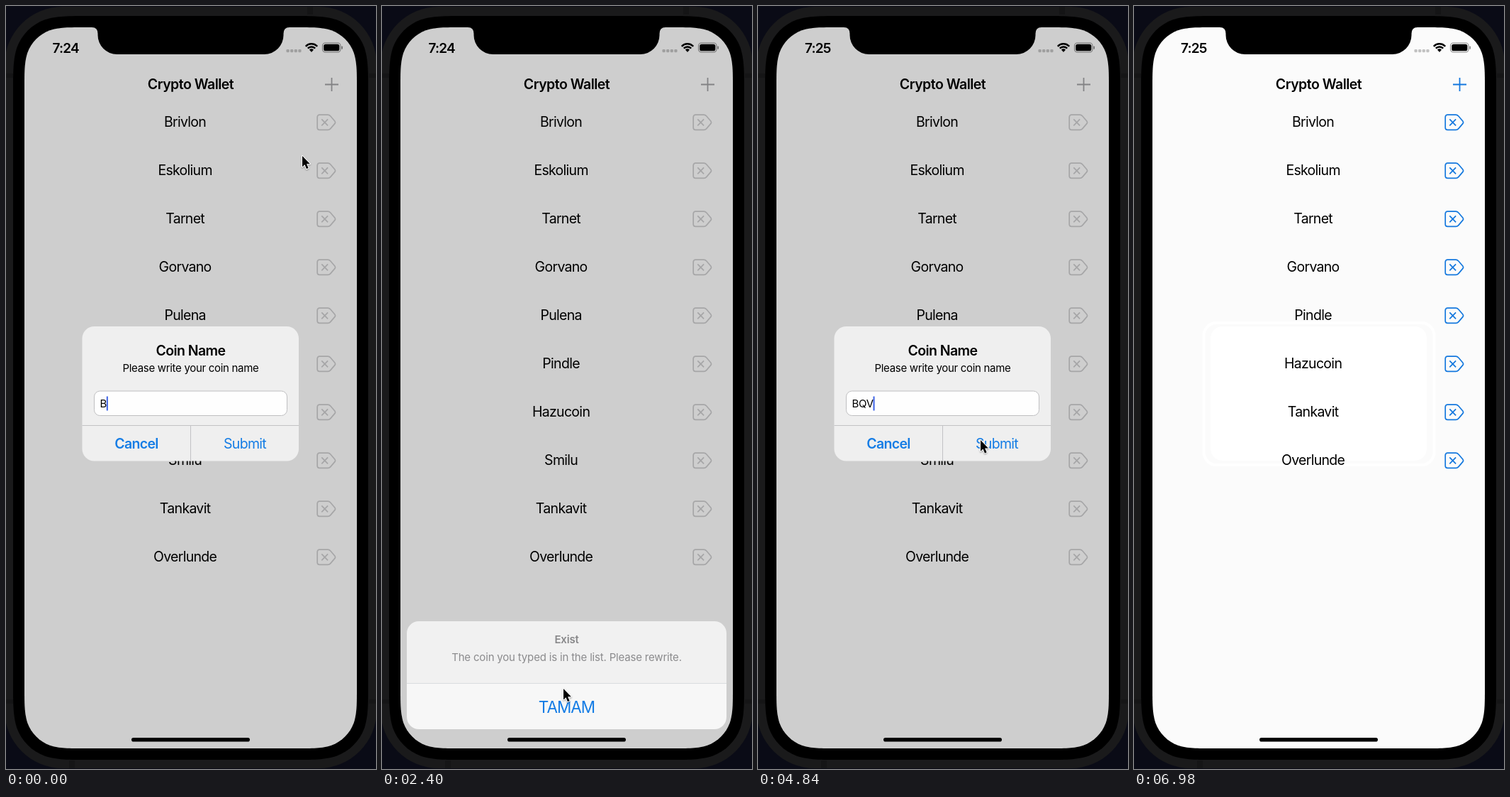
An HTML page with a canvas that plays this animation: 522x1074 px, repeating every 7100 ms.

```html
<!DOCTYPE html>
<html lang="en">
<head>
<meta charset="utf-8">
<title>Coin list</title>
<style>
html, body { margin: 0; width: 100%; height: 100%; overflow: hidden; background: #0a0b16; }
canvas { display: block; width: 522px; height: 1074px; }
</style>
</head>
<body>
<canvas id="stage"></canvas>
<script>
const W = 522, H = 1074, LOOP = 7100;
const canvas = document.getElementById('stage');
const ratio = window.devicePixelRatio || 1;
canvas.width = W * ratio;
canvas.height = H * ratio;
const ctx = canvas.getContext('2d');

const MID = 260.5, ROW_TOP = 163, ROW_STEP = 68;
const LINK = '#147ce5';
const coins = ['Brivlon', 'Eskolium', 'Tarnet', 'Gorvano', 'Pulena', 'Pindle',
  'Hazucoin', 'Smilu', 'Tankavit', 'Overlunde', 'BQV'];
const ADDED_AT = 4900;
// row index -> start and end of its removal
const removals = { 10: [5680, 5960], 7: [6190, 6470], 4: [6470, 6690] };

const pointerPath = [
  [500, 417, 210], [1000, 314, 607], [1500, 321, 584], [1700, 321, 584],
  [1800, 347, 532], [2350, 255, 960], [2500, 255, 960], [3050, 467, 100],
  [4520, 467, 100], [4820, 313, 610], [4960, 313, 612], [5340, 318, 845],
  [5580, 443, 833], [5780, 443, 833], [6060, 446, 631], [6220, 446, 631],
  [6400, 449, 440], [6820, 449, 440], [6975, -30, 305]
];
const clicks = [1000, 2420, 3060, 4850, 5600, 6070, 6410];
const CLICK_MS = 150;

const firstKeys = [-1, 40, 360, 440, 500, 560, 620];
const secondKeys = [3980, 4080, 4180];

const clamp = v => Math.max(0, Math.min(1, v));
const lerp = (a, b, p) => a + (b - a) * p;
const smooth = p => p * p * (3 - 2 * p);
const easeOut = p => 1 - (1 - p) ** 3;
const span = (t, a, b) => clamp((t - a) / (b - a));
const grey = v => `rgb(${v},${v},${v})`;
const mix = (a, b, p) => `rgb(${a.map((v, i) => Math.round(lerp(v, b[i], p)))})`;

function box(x, y, w, h, r) {
  ctx.beginPath();
  ctx.roundRect(x, y, w, h, r);
}

function fillBox(x, y, w, h, r, color) {
  box(x, y, w, h, r);
  ctx.fillStyle = color;
  ctx.fill();
}

// rectangle whose corners ease gradually into the sides
function softBox(x, y, w, h, r) {
  const corners = [[x, y, 0, 1, 1, 0], [x + w, y, -1, 0, 0, 1],
    [x + w, y + h, 0, -1, -1, 0], [x, y + h, 1, 0, 0, -1]];
  ctx.beginPath();
  for (const [cx, cy, ax, ay, bx, by] of corners) {
    // a runs along the incoming side, b along the outgoing one
    const at = (a, b) => [cx + r * (a * ax + b * bx), cy + r * (a * ay + b * by)];
    ctx.lineTo(...at(1.529, 0));
    ctx.bezierCurveTo(...at(1.088, 0), ...at(0.868, 0), ...at(0.631, 0.075));
    ctx.bezierCurveTo(...at(0.373, 0.169), ...at(0.169, 0.373), ...at(0.075, 0.631));
    ctx.bezierCurveTo(...at(0, 0.868), ...at(0, 1.088), ...at(0, 1.529));
  }
  ctx.closePath();
}

function line(color, width, ...points) {
  ctx.beginPath();
  for (let i = 0; i < points.length; i += 4) {
    ctx.moveTo(points[i], points[i + 1]);
    ctx.lineTo(points[i + 2], points[i + 3]);
  }
  ctx.strokeStyle = color;
  ctx.lineWidth = width;
  ctx.stroke();
}

// y is the middle of the capital letters
function label(str, x, y, { size = 19.5, weight = 400, color = '#000', track = -0.7, align = 'center' } = {}) {
  ctx.font = `${weight} ${size}px Inter, "Noto Sans", sans-serif`;
  ctx.letterSpacing = track + 'px';
  ctx.textAlign = align;
  ctx.fillStyle = color;
  ctx.fillText(str, x, y + size * 0.364);
  return ctx.measureText(str).width;
}

function dimAt(t) {
  if (t < 1600) return 1 - smooth(span(t, 1100, 1500));
  if (t < 2450) return smooth(span(t, 1770, 2120));
  if (t < 3100) return 1 - smooth(span(t, 2490, 2880));
  if (t < 4700) return easeOut(span(t, 3170, 3470));
  return 1 - smooth(span(t, 4880, 5230));
}

function alertState(t) {
  if (t < 1600) return { alpha: 1 - smooth(span(t, 1100, 1500)), scale: 1 };
  if (t < 3170) return { alpha: 0, scale: 1 };
  const p = easeOut(span(t, 3170, 3470));
  return { alpha: p * (1 - smooth(span(t, 4880, 5230))), scale: lerp(1.16, 1, p) };
}

function sheetOffset(t) {
  if (t < 2450) return 179 * (1 - easeOut(span(t, 1748, 2160)));
  return 179 * smooth(span(t, 2490, 2880));
}

function typed(t) {
  const early = t < 2500;
  const keys = early ? firstKeys : secondKeys;
  return (early ? coins[0] : coins[10]).slice(0, keys.filter(k => t >= k).length);
}

function deviceBody() {
  ctx.fillStyle = '#0a0b16';
  ctx.fillRect(0, 0, W, H);
  fillBox(-2, 1, 525, 1072, 82, '#1a1a1b');
  ctx.fillStyle = '#151516';
  ctx.fillRect(425, 1, 8, 11);
  ctx.fillRect(89, 1062, 8, 11);
  for (const y of [95, 976]) {
    ctx.fillRect(0, y, 10, 6);
    ctx.fillRect(512, y, 10, 6);
  }
  softBox(10, 14, 501, 1047, 71);
  ctx.fillStyle = '#000';
  ctx.fill();
}

function notch() {
  ctx.beginPath();
  ctx.moveTo(121, 28);
  ctx.lineTo(121, 30);
  ctx.quadraticCurveTo(129.5, 30, 129.5, 39);
  ctx.arcTo(129.5, 68, 158, 68, 27);
  ctx.arcTo(391.5, 68, 391.5, 39, 27);
  ctx.lineTo(391.5, 39);
  ctx.quadraticCurveTo(391.5, 30, 400, 30);
  ctx.lineTo(400, 28);
  ctx.fillStyle = '#000';
  ctx.fill();
}

function statusBar(t) {
  label(t < 4520 ? '7:24' : '7:25', 84.2, 59, { size: 19, weight: 600, track: -0.8 });
  for (let i = 0; i < 4; i++) fillBox(395.5 + i * 5.6, 61, 4.2, 4.2, 1.3, '#c2c2c2');
  // wifi: two arcs over a wedge
  ctx.strokeStyle = ctx.fillStyle = '#000';
  ctx.lineWidth = 2.5;
  for (const r of [11.2, 7.1]) {
    ctx.beginPath();
    ctx.arc(431, 64.5, r, -Math.PI * 0.76, -Math.PI * 0.24);
    ctx.stroke();
  }
  ctx.beginPath();
  ctx.moveTo(431, 65);
  ctx.arc(431, 64.5, 4.2, -Math.PI * 0.76, -Math.PI * 0.24);
  ctx.fill();
  box(446.5, 52, 25.5, 13, 4);
  ctx.strokeStyle = '#8c8c8c';
  ctx.lineWidth = 1.1;
  ctx.stroke();
  fillBox(448.2, 53.7, 22.1, 9.6, 2.6, '#000');
  fillBox(473.3, 56.4, 1.7, 4.4, 1, '#8c8c8c');
}

function deleteIcon(y, color) {
  ctx.save();
  ctx.translate(439.2, y - 9.8);
  ctx.beginPath();
  ctx.moveTo(3.2, 0);
  ctx.lineTo(14.8, 0);
  ctx.quadraticCurveTo(17, 0, 18.6, 1.8);
  ctx.lineTo(24.8, 9);
  ctx.quadraticCurveTo(26, 10.6, 24.8, 12.2);
  ctx.lineTo(18.6, 19.4);
  ctx.quadraticCurveTo(17, 21.2, 14.8, 21.2);
  ctx.lineTo(3.2, 21.2);
  ctx.quadraticCurveTo(0, 21.2, 0, 18);
  ctx.lineTo(0, 3.2);
  ctx.quadraticCurveTo(0, 0, 3.2, 0);
  ctx.strokeStyle = color;
  ctx.lineWidth = 1.7;
  ctx.stroke();
  line(color, 1.7, 6.1, 6.1, 14.9, 15.1, 14.9, 6.1, 6.1, 15.1);
  ctx.restore();
}

function coinRows(t, color) {
  const gone = i => removals[i] ? smooth(span(t, ...removals[i])) : 0;
  coins.forEach((name, i) => {
    const fade = gone(i);
    if (fade === 1 || (i === 10 && t < ADDED_AT)) return;
    const above = Object.keys(removals).filter(k => +k < i);
    const y = ROW_TOP + ROW_STEP * (i - above.reduce((sum, k) => sum + gone(k), 0));
    ctx.globalAlpha = 1 - fade;
    label(name, 252.6, y);
    deleteIcon(y, color);
    ctx.globalAlpha = 1;
  });
}

// faint white trace left where the alert stood
function alertTrace(t, dim) {
  ctx.globalAlpha = 1 - dim;
  fillBox(108, 451, 305, 189, 17, '#fff');
  if (t > 3170) {
    box(98.5, 446, 325, 200, 18);
    ctx.strokeStyle = '#fff';
    ctx.lineWidth = 4;
    ctx.stroke();
  }
  ctx.globalAlpha = 1;
}

function page(t, dim) {
  ctx.fillStyle = '#fbfbfb';
  ctx.fillRect(26, 30, 469, 1015);
  alertTrace(t, dim);
  const tint = Math.sqrt(dim);
  statusBar(t);
  label('Crypto Wallet', MID, 110, { weight: 600, track: -0.52 });
  line(mix([20, 120, 222], [160, 160, 162], tint), 1.8, 450, 110.5, 469, 110.5, 459.5, 101, 459.5, 120);
  coinRows(t, mix([20, 120, 222], [202, 202, 204], tint));
  ctx.fillStyle = `rgba(0,0,0,${0.18 * dim})`;
  ctx.fillRect(26, 30, 469, 1015);
}

function alertBox(t) {
  const { alpha, scale } = alertState(t);
  if (!alpha) return;
  ctx.save();
  ctx.globalAlpha = alpha;
  ctx.translate(MID, 545.5);
  ctx.scale(scale, scale);
  ctx.translate(-MID, -545.5);
  fillBox(107.5, 451, 305.5, 189.5, 17, grey(239));
  label('Coin Name', MID, 485, { weight: 600, track: -0.6 });
  label('Please write your coin name', MID, 509.5, { size: 15, track: -0.3 });
  box(124.5, 542, 272, 34.5, 8);
  ctx.fillStyle = '#fefefe';
  ctx.fill();
  ctx.strokeStyle = '#bfbfc1';
  ctx.lineWidth = 1;
  ctx.stroke();
  const str = typed(t);
  const width = label(str, 132.5, 560, { size: 15, track: -0.3, align: 'left' });
  ctx.globalAlpha = alpha * (t < 2000 ? 1 : span(t, 3430, 3540));
  ctx.fillStyle = '#3d62e6';
  ctx.fillRect(str ? 132.5 + width - 0.2 : 133, 549.5, 2, 20);
  ctx.globalAlpha = alpha;
  line('#c2c2c4', 1, 107.5, 590.5, 413, 590.5, MID, 590.5, MID, 640.5);
  label('Cancel', 184, 616, { weight: 600, color: LINK });
  label('Submit', 337, 616, { color: LINK });
  ctx.restore();
}

function actionSheet(t, dim) {
  if (t < 1748 || t > 2880) return;
  ctx.save();
  ctx.translate(0, sheetOffset(t));
  box(35, 866, 451, 152, 17);
  ctx.clip();
  ctx.fillStyle = grey(Math.round(lerp(252, 241, dim)));
  ctx.fillRect(35, 866, 451, 87);
  ctx.fillStyle = grey(Math.round(lerp(252, 247, dim)));
  ctx.fillRect(35, 953, 451, 65);
  line('#d9dddf', 1, 35, 953.5, 486, 953.5);
  label('Exist', MID, 891.5, { size: 15, weight: 600, color: '#88888a', track: -0.2 });
  label('The coin you typed is in the list. Please rewrite.', MID, 916.5, { size: 15, color: '#8b8b8d', track: -0.18 });
  label('TAMAM', MID, 986.5, { size: 22.5, color: LINK, track: -1 });
  ctx.restore();
}

function pointerAt(t) {
  const next = pointerPath.findIndex(p => p[0] > t);
  if (next === 0) return pointerPath[0].slice(1);
  if (next < 0) return pointerPath.at(-1).slice(1);
  const [ta, xa, ya] = pointerPath[next - 1];
  const [tb, xb, yb] = pointerPath[next];
  const p = smooth(span(t, ta, tb));
  return [lerp(xa, xb, p), lerp(ya, yb, p)];
}

function pointer(t) {
  const [x, y] = pointerAt(t);
  if (x < -20) return;
  ctx.save();
  ctx.translate(x + 1, y + 1);
  if (clicks.some(c => t >= c && t < c + CLICK_MS)) {
    ctx.beginPath();
    ctx.arc(-1.5, 0, 24.3, 0, Math.PI * 2);
    ctx.strokeStyle = '#000';
    ctx.lineWidth = 1.6;
    ctx.stroke();
  }
  ctx.scale(1.05, 1.05);
  const arrow = new Path2D('M0 0V14.8L3.3 11.7L5.7 17.4L8.2 16.3L5.8 10.8H10.4Z');
  ctx.shadowColor = 'rgba(0,0,0,.35)';
  ctx.shadowBlur = 2 * ratio;
  ctx.shadowOffsetY = ratio;
  ctx.lineJoin = 'round';
  ctx.strokeStyle = '#fff';
  ctx.lineWidth = 2;
  ctx.stroke(arrow);
  ctx.shadowColor = 'transparent';
  ctx.fillStyle = '#000';
  ctx.fill(arrow);
  ctx.restore();
}

function draw(t) {
  const dim = dimAt(t);
  ctx.setTransform(ratio, 0, 0, ratio, 0, 0);
  deviceBody();
  ctx.save();
  softBox(26, 30, 469, 1015, 57);
  ctx.clip();
  page(t, dim);
  alertBox(t);
  actionSheet(t, dim);
  fillBox(177, 1030, 167, 5.6, 2.8, '#000');
  ctx.restore();
  notch();
  pointer(t);
}

const start = performance.now();
function tick() {
  draw((performance.now() - start) % LOOP);
  requestAnimationFrame(tick);
}
tick();
</script>
</body>
</html>
```
